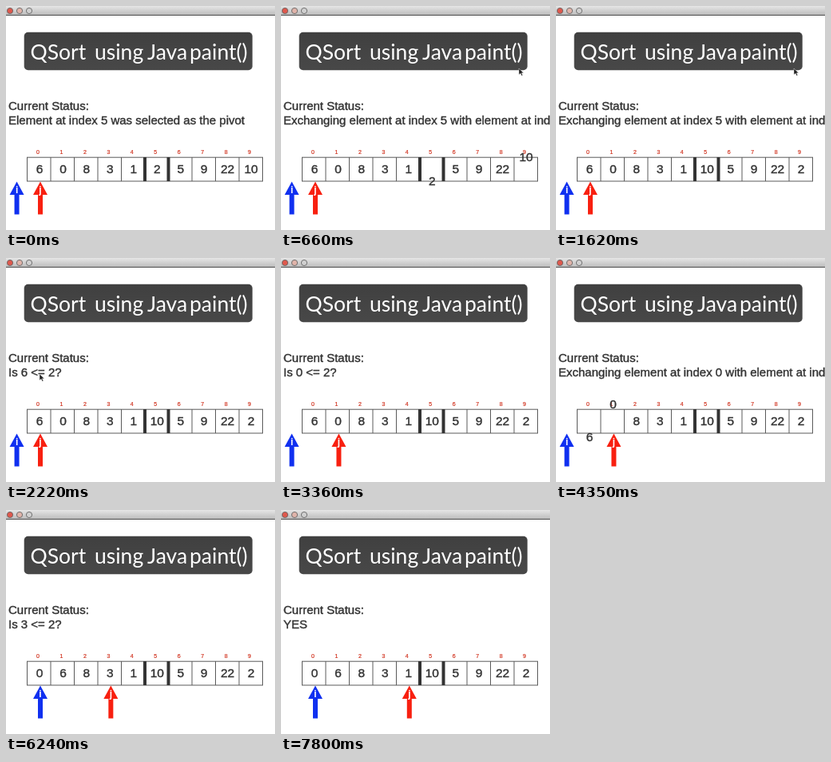
These frames come from a looping animation (337 px wide and 280 px high, 8000 ms). An HTML page:

```html
<!DOCTYPE html>
<html lang="en">
<head>
<meta charset="utf-8">
<title>QSort using Java paint()</title>
<style>
  html, body { margin: 0; width: 100%; height: 100%; overflow: hidden; background: #fff; }
  svg { display: block; width: 100vw; height: 100vh; }
  text { font-family: "Liberation Sans", Arial, sans-serif; }
  .title { font: 26.5px Lato, "Open Sans", sans-serif; fill: #fff; }
  .status, .value { fill: #333; stroke: #333; stroke-width: .4; }
  .status { font-size: 15px; }
  .value { font-size: 15.5px; text-anchor: middle; }
  .index { font-size: 7px; fill: #d0301c; stroke: #d0301c; stroke-width: .2; text-anchor: middle; }
  .tag { font-size: 12px; font-weight: bold; fill: #fff; text-anchor: middle; }
  .grid { fill: none; stroke: #5a5a5a; }
</style>
</head>
<body>
<svg id="stage" viewBox="0 0 337 280">
  <defs>
    <linearGradient id="bar" x2="0" y2="1">
      <stop stop-color="#e6e6e6"/><stop offset="1" stop-color="#bcbcbc"/>
    </linearGradient>
    <linearGradient id="panel" x2="0" y2="1">
      <stop stop-color="#404040"/><stop offset="1" stop-color="#484848"/>
    </linearGradient>
    <path id="arrow" d="M0 219.5L9 236H3V260.5H-3V236H-9Z"/>
  </defs>
  <rect width="337" height="280" fill="#fff"/>
  <rect width="337" height="11" fill="url(#bar)"/>
  <path d="M0 11.5H337" stroke="#4c4c4c"/>
  <g stroke="#666" stroke-width=".9">
    <circle cx="5" cy="6" r="3.6" fill="#e0584c"/>
    <circle cx="17" cy="6" r="3.6" fill="#e0b4aa"/>
    <circle cx="29" cy="6" r="3.6" fill="#d0d0d0"/>
  </g>
  <rect x="22.7" y="32.7" width="286" height="47.5" rx="5" fill="url(#panel)"/>
  <text class="title" y="67"><tspan x="30.5">QSort </tspan><tspan x="111">using </tspan><tspan x="177">Java </tspan><tspan x="230">paint()</tspan></text>
  <text class="status" x="3" y="130">Current Status:</text>
  <text class="status" id="status" x="3" y="148"></text>
  <g id="cells"></g>
  <path d="M174 189V219M203.5 189V219" stroke="#333" stroke-width="4"/>
  <g id="i"><use href="#arrow" fill="#1030f0"/><text class="tag" y="234">i</text></g>
  <g id="j"><use href="#arrow" fill="#f82010"/><text class="tag" y="234">j</text></g>
  <g id="values"></g>
  <path id="cursor" d="M0 0V8L2 6.3L3.5 9.3L4.8 8.6L3.4 5.8H6Z" fill="#222" stroke="#fff" stroke-width=".4"/>
</svg>
<script>
const LOOP = 8000, FRAME = 30, PITCH = 29.45, LIFT = 30, SPEED = 0.198;
const LEFT = 42, BASE = 208.7;
const START = [6, 0, 8, 3, 1, 2, 5, 9, 22, 10];
const $ = id => document.getElementById(id);

// time, status line, position of i, position of j
const steps = [
  [0, "Element at index 5 was selected as the pivot", -1, 0],
  [570, "Exchanging element at index 5 with element at index 9", -1, 0],
  [1890, "Is 6 <= 2?", -1, 0],
  [2670, "Is 0 <= 2?", -1, 1],
  [3450, "YES", -1, 1],
  [4230, "Exchanging element at index 0 with element at index 1", -1, 1],
  [5460, "Is 8 <= 2?", 0, 2],
  [6240, "Is 3 <= 2?", 0, 3],
  [7020, "Is 1 <= 2?", 0, 4],
  [7800, "YES", 0, 4]
];

const swaps = [{ at: 584, a: 5, b: 9 }, { at: 4245, a: 0, b: 1 }];

// time, x, y of the pointer tip
const pointer = [
  [60, 340, 190], [300, 318, 120], [510, 298, 78], [1650, 298, 78],
  [1950, 160, 118], [2200, 42, 145], [2700, 42, 145], [3000, 49, 78], [3300, 58, -12]
];

function add(parent, tag, attrs, text = "") {
  const el = document.createElementNS("http://www.w3.org/2000/svg", tag);
  for (const k in attrs) el.setAttribute(k, attrs[k]);
  el.textContent = text;
  return parent.appendChild(el);
}

const place = (el, x, y) => el.setAttribute("transform", `translate(${x} ${y})`);
const clamp = (v, max) => Math.max(0, Math.min(max, v));

add($("cells"), "rect", { class: "grid", x: 26.5, y: 189.2, width: 295, height: 29.8 });
START.forEach((_, n) => {
  const x = 26.5 + n * 29.5;
  if (n) add($("cells"), "path", { class: "grid", d: `M${x} 189V219` });
  add($("cells"), "text", { class: "index", x: 40 + n * PITCH, y: 185 }, n);
});
const labels = START.map(v => add($("values"), "text", { class: "value" }, v));

// Out of the row, along it, and back in
function shift(el, from, to, dir, dist) {
  const run = Math.abs(to - from) * PITCH;
  const along = clamp(dist - LIFT, run) * Math.sign(to - from);
  const off = clamp(dist, LIFT) - clamp(dist - LIFT - run, LIFT);
  place(el, LEFT + from * PITCH + along, BASE + dir * off);
}

function drawValues(t) {
  const row = [...labels];
  row.forEach((el, n) => place(el, LEFT + n * PITCH, BASE));
  for (const { at, a, b } of swaps) {
    if (t < at) break;
    const dist = (t - at) * SPEED;
    shift(row[a], a, b, 1, dist);
    shift(row[b], b, a, -1, dist);
    [row[a], row[b]] = [row[b], row[a]];
  }
}

function drawPointer(t) {
  const n = pointer.findIndex(p => p[0] > t);
  $("cursor").style.display = n > 0 ? "" : "none";
  if (n < 1) return;
  const [t0, x0, y0] = pointer[n - 1], [t1, x1, y1] = pointer[n];
  const k = (t - t0) / (t1 - t0);
  place($("cursor"), x0 + (x1 - x0) * k, y0 + (y1 - y0) * k);
}

function draw(now) {
  const t = Math.floor((now % LOOP) / FRAME) * FRAME;
  const [, line, i, j] = steps.filter(s => s[0] <= t).pop();
  if ($("status").textContent !== line) $("status").textContent = line;
  place($("i"), 43 + i * PITCH, 0);
  place($("j"), 43 + j * PITCH, 0);
  drawValues(t);
  drawPointer(t);
}

const begin = performance.now();
function tick() {
  draw(performance.now() - begin);
  requestAnimationFrame(tick);
}
tick();
</script>
</body>
</html>
```
